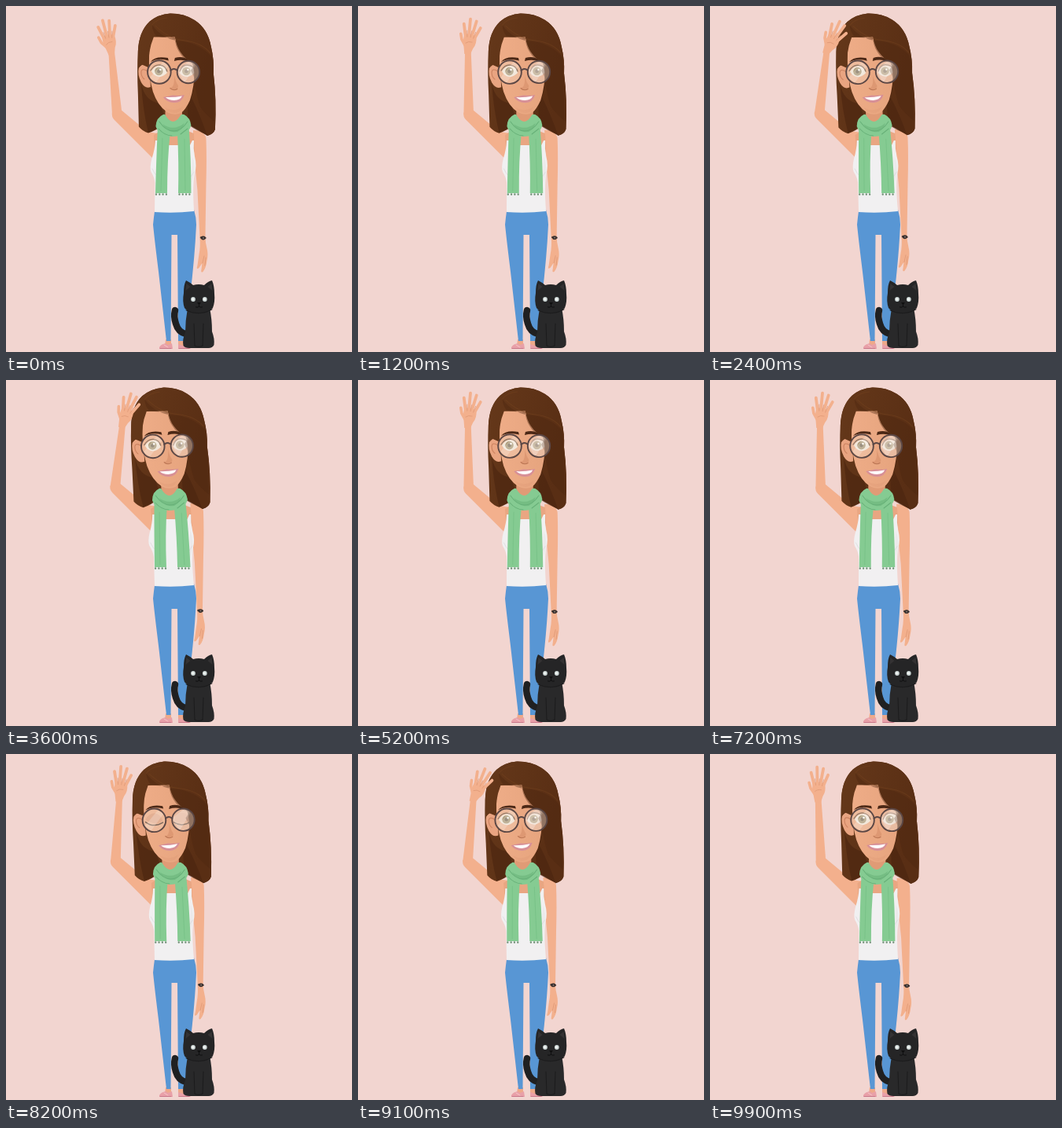
Recreate the animation shown at these times as an HTML page. Size 440x440 px, loop 10000 ms.

```html
<!DOCTYPE html>
<html lang="en">
<head>
<meta charset="utf-8">
<title>Waving woman with a cat</title>
<style>
html, body { margin: 0; width: 100%; height: 100%; overflow: hidden; background: #f2d5d0; }
svg { display: block; width: 100vw; height: 100vh; }
</style>
</head>
<body>
<svg viewBox="0 0 440 440" fill="none" stroke-linecap="round" stroke-linejoin="round">
  <defs>
    <linearGradient id="hairTone" x1="0" x2="1" y1="0" y2="0.4">
      <stop offset="0" stop-color="#65381a"/>
      <stop offset="1" stop-color="#592e14"/>
    </linearGradient>
    <linearGradient id="skinTone" x1="0" x2="1">
      <stop offset="0" stop-color="#eeac87"/>
      <stop offset="1" stop-color="#e6a47e"/>
    </linearGradient>
    <clipPath id="rightLens"><circle cx="232" cy="84" r="14"/></clipPath>
  </defs>

  <!-- legs -->
  <g>
    <path fill="#eea98a" d="M203 424h7v8h-8zM219 424h8v8h-8z"/>
    <path fill="#e8a0a8" d="M195 434q2-4 8-5l3 2 5-2 1 7h-17zM219 430l6 2 5-1 5 5h-16z"/>
    <path stroke="#c9788a" d="M196 435.500h14M220 435.500h13"/>
    <path stroke="#f7c3c6" d="M201 431l5 3"/>
    <path fill="#5896d4" d="M189 261q25 2 50-2 3 10 3 19-2 42-8 92l-6 56h-9l-1-135h-7.500l-1 135h-5.500l-10-88q-5-40-7-60 1-10 2-17z"/>
  </g>

  <!-- hanging arm -->
  <g id="lowArm">
    <path fill="#f3b08d" d="M238 158q14 0 16.500 10 1 25 0 60l-1 66q0 6 2 14 2 8 0 16-1 9-5 14-3 2-2-3l1-8-4 6q-4 3-2-3l2-14q2-10 1-22l-3-60-5-50z"/>
    <path stroke="#dd9775" stroke-width=".8" d="M250 327l2-9M253 330l1-10"/>
    <path stroke="#4a3d39" stroke-width="2.400" d="M248 294.500l5.500 .5"/>
    <ellipse cx="250.800" cy="295" rx="2.800" ry="2.400" fill="#342e2d"/>
    <circle cx="251" cy="295" r="1" fill="#8b7771"/>
  </g>

  <!-- raised upper arm -->
  <g class="highArm">
    <path fill="#f3b08d" d="M135 136q-1 5 3 9l51 51 4-34-13-2-35-29z"/>
  </g>

  <!-- torso -->
  <g class="body">
    <path fill="#e9a682" d="M188 164q12-8 25-8t26 6l1 24h-51z"/>
    <path fill="#f1f0f1" d="M190 171l3 0 3 6h38l3-6 2 0q-1 10 1 20 3 12 0 22-3 15-1 46v2q-25 3-50 1l.5-37q-1-8-5-14-2-6 1-17 4-12 4.500-23z"/>
    <path fill="#e4e2e4" d="M237 192q4 10 2 22l-4 14z" opacity=".45"/>
    <path stroke="#dddade" stroke-width=".8" d="M186 207q3 7 6 9M239 211l-4 6"/>
  </g>

  <!-- hair behind the face -->
  <g class="head">
    <path fill="url(#hairTone)" d="M209 9.500q-15 1-26 10-14 13-15 38-1.500 24 0 55l1 41q5 6 12 8 10-3 20-11h31q12 7 24 14.500 8-2 10-8 2-38-2-71 1-17-3-34-4-23-21-34-13-8.500-31-8.500z"/>
    <path fill="#4c2610" d="M231 126q4-18 8-28 8 30 17 66-13-5-24-13zM172 98q4 23 24 26l6 18-12 15-9 4q-7-30-9-63z" opacity=".65"/>
  </g>

  <!-- neck and scarf -->
  <g class="body">
    <path fill="#e09b76" d="M203 124h21v28h-22z"/>
    <g fill="#85cb92">
      <path d="M193 154q-2 45-3 84h15q0-42 4-78z"/>
      <path d="M218 160q2 40 1 78h16.500q0-45-3-86z"/>
      <path d="M200 138q-9 4-9.500 15 2 8 12 11 10 4 20 0 11-4 13-12-1-10-9-14-4-1-5 2-9 14-18 0-1-3-3.500-2z"/>
    </g>
    <path fill="#6db77e" d="M199 150q14 10 28-1-4 13-15 11-9-2-13-10z" opacity=".7"/>
    <path stroke="#67b078" stroke-width="1" d="M195 147q8 12 18 12t18-12M194 156q8 9 17 9M222 163l9-7"/>
    <path stroke="#79c288" stroke-width="1" d="M199 168l-2 67M227 169l1 66"/>
    <path stroke="#6f8f75" stroke-width="2.400" stroke-dasharray="0 4.300" d="M191 239.500h14M220.500 239.500h15"/>
  </g>

  <!-- face -->
  <g class="head">
    <path fill="#e9a481" d="M183 77q-10-6-14 2-2 8 3 18 5 9 12 6z"/>
    <path stroke="#cc8361" stroke-width="1.100" d="M180 83q-7-5-8 1 0 6 4 9"/>
    <path fill="url(#skinTone)" d="M185 36h44q12 18 11 42 0 24-6 42-5 11-11 16-9 4-18-1-12-8-18-26-5-18-5-36 0-20 3-37z"/>
    <path fill="#d98f6c" d="M202 129q11 7 23-1-3 8-11 8-8 0-12-7z" opacity=".2"/>
    <path fill="#4b2816" d="M184 71q6-8 22-5l1 3.500q-13-4-23 1.500zM214 70l1-4q10-3 18 3v2q-9-4-19-1z"/>
    <!-- eyes -->
    <g id="openEyes">
      <path fill="#f1e8dc" d="M185 83q4-7 11-7 7 1 9 9-5 5-10 5-7-1-10-7zM221 85q3-8 9-9 8 0 11 7-4 6-10 7-7 0-10-5z"/>
      <g fill="#938058"><circle cx="194.500" cy="83" r="5.300"/><circle cx="229.500" cy="83" r="5.300"/></g>
      <g fill="#55452f"><circle cx="194.500" cy="83" r="2.300"/><circle cx="229.500" cy="83" r="2.300"/></g>
      <g fill="#fff"><circle cx="196.500" cy="81" r="1.300"/><circle cx="231.500" cy="81" r="1.300"/></g>
      <path stroke="#70503c" stroke-width="1.300" d="M184 82q5-8 12-7 7 1 9 8M221 83q3-8 9-8 8 0 11 7"/>
    </g>
    <g id="closedEyes" display="none">
      <path fill="#dd9976" d="M184 83q4-8 12-8 7 1 10 10-10 7-22-2zM220 85q3-9 10-10 8 0 12 8-10 8-22 2z"/>
      <path stroke="#563a2b" stroke-width="1.500" d="M184 86q10 8 22 1M220 87q11 7 22-1"/>
    </g>
    <path fill="#d68d69" d="M214 88q2 9 5 13 1 5-5 6-5 0-6-3 7 1 6-16z" opacity=".6"/>
    <path stroke="#b97453" d="M209 104.500q4 4 9 1"/>
    <path fill="#d78f96" d="M200 116q7-1.500 12-2.500 8 1 15-.5-3 10-13 10-9 0-14-7z"/>
    <path fill="#fffafa" d="M203 116q11 .5 21-1.500-2 5-10 5.500-7 0-11-4z"/>

    <!-- hair in front -->
    <path fill="url(#hairTone)" d="M209 9.500q-15 1-26 10-14 13-15 38v22l5-5 9 4q-2-20 6-39h27q2 12 7 19 6 9 15 14 4 13 3 26-1 10-4 18 12 24 20 48.500 8-2 10-8 2-38-2-71 1-17-3-34-4-23-21-34-13-8.500-31-8.500z"/>
    <path fill="#4d2711" d="M186 24q14 20 39 21 22 3 37 20l2 37q0 20 1 45-12-10-18-19-7-20-9-54-12-5-18-16-5-8-5-18-15 1-24-2-5-7-5-14z" opacity=".4"/>
    <path stroke="#74431f" stroke-width="1" d="M186 24q6-8 19-9M190 25q17 17 38 19 22 3 32 16" opacity=".5"/>

    <!-- glasses -->
    <circle cx="195" cy="84" r="14.500" fill="#f6e9dc" fill-opacity=".28"/>
    <g clip-path="url(#rightLens)">
      <path fill="#ead8ca" fill-opacity=".45" d="M218 70h28v28h-28z"/>
      <path fill="#fff" fill-opacity=".25" d="M218 82l18-14 5 8-14 22z"/>
      <path fill="#846a5a" fill-opacity=".4" d="M235 82l9-13 6 29h-7z"/>
    </g>
    <path fill="#fff" fill-opacity=".22" d="M183 91l17-20 7 5-16 21z"/>
    <g stroke="#5b4745" stroke-width="1.900">
      <circle cx="195" cy="84" r="14.800"/>
      <circle cx="232" cy="84" r="14.200"/>
      <path d="M209.500 82q4-4 8.500 0"/>
    </g>
  </g>

  <!-- raised forearm and hand -->
  <g class="highArm">
    <g id="forearm">
      <path fill="#f3b08d" d="M135 138l-4.500-78q3-5 7.500-2l9 74q-2 8-8 8-3 0-4-2z"/>
      <g id="hand">
        <path fill="#f3b08d" d="M130 62l-2-10q-2-5-1-14 6-4 15.500 0 2 10-2.500 16l-2.500 8z"/>
        <path stroke="#f3b08d" stroke-width="3.800" d="M129 40l-4-16M133 38l-.5-21M137 38l3.500-19M140.500 41l6-14"/>
        <path stroke="#f3b08d" stroke-width="3.600" d="M129.500 51l-5-7-2-7"/>
        <path stroke="#dd9775" stroke-width=".7" d="M131 40l-1-8M135.300 40l.5-8M139 41l2-8M130 48q3-3 8-2"/>
      </g>
    </g>
  </g>

  <!-- cat -->
  <g>
    <path stroke="#202021" stroke-width="8.500" d="M229 417q-10-2-13-13-3-9-1-17"/>
    <path fill="#29292a" d="M231 384q-3 16-3 31-4 9-2.500 17 2 3 8 3h24q5 0 7-4 1-8-2.500-17 0-16-3-30z"/>
    <path fill="#252526" d="M226 365q0-11 3-16 6 3 9 6 7-2 14 0 5-5 10-6 3 7 3 17 1 10-2 18-6 8-18 7-13 0-18-7-3-8-1-19z"/>
    <path fill="#343233" d="M229.500 353l5 4-6 5zM261.500 353l-5 4 6 5z"/>
    <path stroke="#1b1b1c" d="M229 387q16 8 33-1M239 404l1 28M251 404l-1 28M240 432q5 3 10 0"/>
    <g fill="#cbd5d4"><circle cx="238" cy="373" r="2.900"/><circle cx="252.800" cy="373" r="2.900"/></g>
    <g fill="#f4f7f5"><circle cx="237.700" cy="372.700" r="1.500"/><circle cx="252.500" cy="372.700" r="1.500"/></g>
    <path fill="#0e0e0f" d="M243 377h5l-2.500 3z"/>
    <path stroke="#0e0e0f" d="M245.500 380v2q-2 2-4 1M245.500 382q2 2 4 1"/>
  </g>
</svg>
<script>
const LOOP = 10000, STEP = 100, WAVES = 15;
const BLINK = [8100, 8300];
const byId = id => document.getElementById(id);
const byClass = name => document.querySelectorAll('.' + name);
const place = (el, value) => el.setAttribute('transform', value);
const show = (el, on) => el.setAttribute('display', on ? 'inline' : 'none');
const [bodies, heads, highArms] = ['body', 'head', 'highArm'].map(byClass);
const [lowArm, forearm, hand, openEyes, closedEyes] =
  ['lowArm', 'forearm', 'hand', 'openEyes', 'closedEyes'].map(byId);

// 0 to 1 and back once per wave; lead is a fraction of a wave
const swing = (t, lead) => (1 - Math.cos(2 * Math.PI * (t * WAVES / LOOP + lead))) / 2;

function draw(t) {
  const sway = swing(t, 0.04);
  const lean = 0.043 * sway;
  bodies.forEach(el => place(el, `matrix(1 0 ${lean} 1 ${-262 * lean} 0)`));
  heads.forEach(el => place(el, `translate(${-7.2 * sway}) rotate(${-1.4 * sway} 213 138)`));
  place(lowArm, `translate(${-3.7 * sway} ${-1.5 * sway})`);
  highArms.forEach(el => place(el, `translate(${-2.6 * sway} ${-1.5 * sway})`));
  place(forearm, `rotate(${13 * swing(t, 0)} 140 138)`);
  place(hand, `rotate(${-15 + 29 * swing(t, -0.08)} 134 59)`);
  const shut = t >= BLINK[0] && t <= BLINK[1];
  show(openEyes, !shut);
  show(closedEyes, shut);
}

const start = performance.now();
function tick(now) {
  const t = Math.max(0, now - start) % LOOP;
  draw(Math.floor(t / STEP) * STEP);
  requestAnimationFrame(tick);
}
draw(0);
requestAnimationFrame(tick);
</script>
</body>
</html>
```
